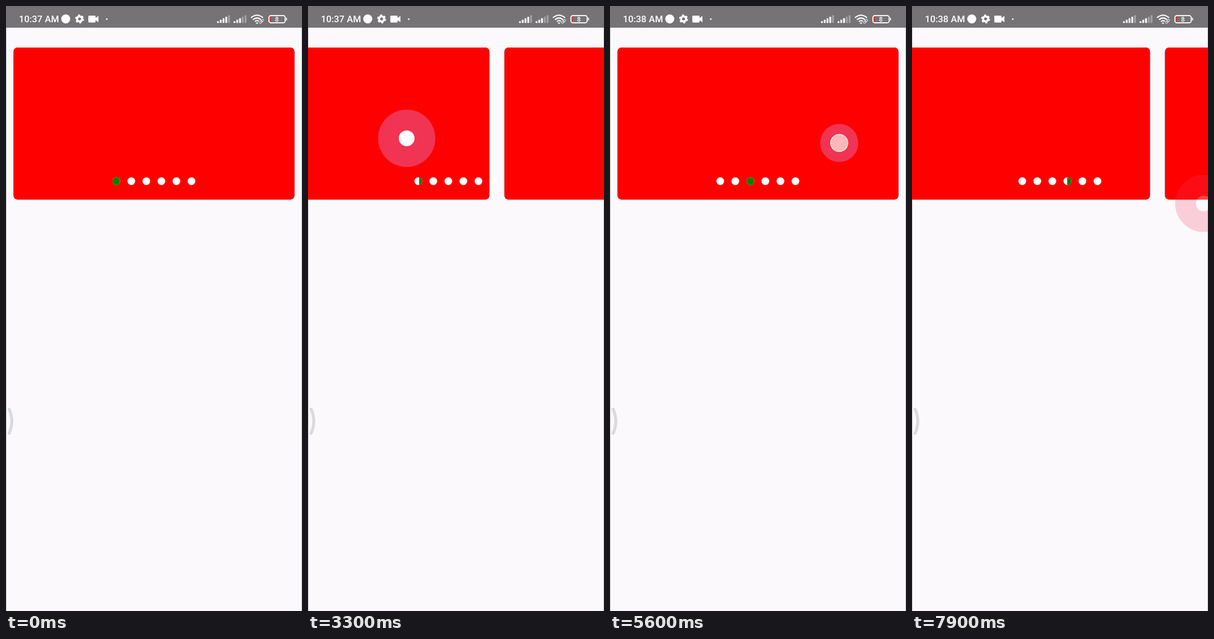
These frames come from a looping animation (492x1005 px, 8000 ms). An HTML page:

```html
<!DOCTYPE html>
<html lang="en">
<head>
<meta charset="utf-8">
<title>Card pager</title>
<style>
  html, body { margin: 0; width: 100%; height: 100%; overflow: hidden; background: #fbf9fb; }
  svg { display: block; width: 100vw; height: 100vh; }
  text { font-family: Roboto, sans-serif; font-weight: 500; fill: #fff; }
  #card { filter: drop-shadow(0 .6px .6px rgba(0, 0, 0, .55)); }
</style>
</head>
<body>
<svg viewBox="0 0 492 1005">
  <defs>
    <rect id="card" x="12.5" y="69" width="467" height="252.4" rx="6.5" fill="#f00"/>
    <clipPath id="dotClip"></clipPath>
  </defs>

  <rect width="492" height="1005" fill="#fbf9fb"/>
  <path d="M.5 36V1005M491.5 36V1005" stroke="#c9c8ca"/>
  <rect width="492" height="36" fill="#757375"/>

  <text id="clock" x="21.5" y="27.3" font-size="15.4"></text>
  <g fill="#fff">
    <circle cx="99.3" cy="21.5" r="7.5"/>
    <circle cx="122.3" cy="21.5" r="4.2" fill="none" stroke="#fff" stroke-width="3.4"/>
    <circle cx="122.3" cy="21.5" r="6.3" fill="none" stroke="#fff" stroke-width="2.2" stroke-dasharray="3.3 3.3"/>
    <rect x="136.8" y="16" width="12" height="11.4" rx="1.3"/>
    <path d="M148 20.5L153.6 16.5V27L148 23Z"/>
    <circle cx="167.5" cy="21.8" r="1.4"/>
  </g>
  <g id="signal"></g>
  <g fill="none" stroke="#fff" stroke-width="2">
    <path d="M407.2 19.5Q417.2 11 427.2 19.5M410.5 22.8Q417.2 17 423.9 22.8M413.7 25.8Q417.2 23 420.2 25.5"/>
    <path d="M415.5 27.5L417.2 29L418.9 27.5" stroke-width="1.5"/>
    <g stroke-width="1.1" stroke="#ddd">
      <rect x="421" y="25" width="5" height="3.2" rx="1.6" transform="rotate(-45 423.5 26.6)"/>
      <rect x="423.5" y="22.8" width="5" height="3.2" rx="1.6" transform="rotate(-45 426 24.4)"/>
    </g>
    <rect x="437" y="15.8" width="27" height="12" rx="3.4" stroke-width="1.7"/>
    <path d="M466.3 19.5V24" stroke-width="1.6"/>
  </g>
  <rect x="438.8" y="18" width="1.8" height="7.6" rx=".8" fill="#f22"/>
  <text x="450.3" y="25.6" font-size="10.5" text-anchor="middle">8</text>

  <use id="cardA" href="#card"/>
  <use id="cardB" href="#card"/>
  <g id="dots" fill="#fff"></g>
  <g clip-path="url(#dotClip)"><rect id="marker" y="284" width="12.8" height="14" fill="#008000"/></g>

  <path d="M5.2 669.8Q14 690 5.2 709.8" fill="none" stroke="#dad9db" stroke-width="5" stroke-linecap="round"/>

  <g id="touch">
    <circle id="halo" fill="none" stroke="#f03c60" stroke-opacity=".88"/>
    <circle id="core" fill="#fff" stroke="#fff" stroke-width="1.2"/>
  </g>
</svg>
<script>
const $ = id => document.getElementById(id);
const set = (el, attrs) => { for (const k in attrs) el.setAttribute(k, attrs[k]); };
const add = (parent, tag, attrs) => {
  const el = document.createElementNS('http://www.w3.org/2000/svg', tag);
  set(el, attrs);
  parent.append(el);
};
const clamp = v => Math.min(1, Math.max(0, v));

const LOOP = 8000, STEP = 100, PAGE = 492, GAP = 25, MARKER_LAG = 40, FADE = 135;

for (let i = 0; i < 6; i++)
  for (const id of ['dots', 'dotClip'])
    add($(id), 'circle', { cx: 183.3 + GAP * i, cy: 291, r: 6.4 });

function signalBars(x, lit) {
  for (let i = 0; i < 5; i++) {
    const h = 3 + 2.5 * i;
    add($('signal'), 'rect', { x: x + 4.6 * i, y: 28.3 - h, width: 3, height: h, rx: 1,
      fill: i < lit ? '#fff' : '#a5a3a5' });
  }
}
signalBars(350.8, 4);
signalBars(378.3, 3);

const glide = u => Math.sin(Math.PI / 2 * u ** .78) ** 2;
const springBack = u => Math.sin(Math.PI * u) ** 1.5;

// down: finger lands at x, y; the page then moves `by` pages and the finger lifts halfway
const gestures = [
  { down: 1725, start: 1700, length: 500, by: .162, ease: springBack, x: 107, y: 230, rise: -8, gone: 2500 },
  { down: 2750, start: 2910, length: 1220, by: 1, x: 342, y: 232, rise: -19 },
  { down: 4560, start: 4600, length: 600, by: 1, x: 355, y: 231, rise: -51 },
  { down: 5501, start: 5600, length: 600, by: 1, x: 381, y: 227.5, rise: -51 },
  { down: 6450, start: 6500, length: 600, by: 1, x: 365, y: 216, rise: -51 },
  { down: 7450, start: 7500, length: 600, by: -1, x: 176, y: 250, rise: 78 }
];

const progress = (g, t) => clamp((t - g.start) / g.length);
const travel = (g, u) => g.by * (g.ease || glide)(u);
const pageAt = t => gestures.reduce((sum, g) => sum + travel(g, progress(g, t)), 0);
const liftTime = g => g.start + g.length / 2;

function drawTouch(t) {
  const g = gestures.find(g => t >= g.down && t < (g.gone || liftTime(g) + 200));
  set($('touch'), { visibility: g ? 'visible' : 'hidden' });
  if (!g) return;
  const u = Math.min(.5, progress(g, t));
  const cx = g.x - PAGE * travel(g, u), cy = g.y + g.rise * u * 2;
  const grown = clamp((t - g.down) / 200);
  const inner = 16 - 3.5 * grown, outer = 16 + 31.5 * grown;
  set($('touch'), { opacity: Math.max(.26, 1 - Math.max(0, t - liftTime(g)) / FADE) });
  set($('halo'), { cx, cy, r: (inner + outer) / 2, 'stroke-width': outer - inner });
  set($('core'), { cx, cy, r: inner, 'fill-opacity': clamp(1.45 * grown) });
}

function frame(now) {
  const t = Math.floor(now % LOOP / STEP) * STEP;
  const shift = -(pageAt(t) % 1) * PAGE;
  set($('cardA'), { x: shift });
  set($('cardB'), { x: shift + PAGE });
  set($('marker'), { x: 176.9 + GAP * pageAt(t - MARKER_LAG) });
  $('clock').textContent = t < 3700 ? '10:37 AM' : '10:38 AM';
  drawTouch(t);
  requestAnimationFrame(frame);
}
frame(performance.now());
</script>
</body>
</html>
```
